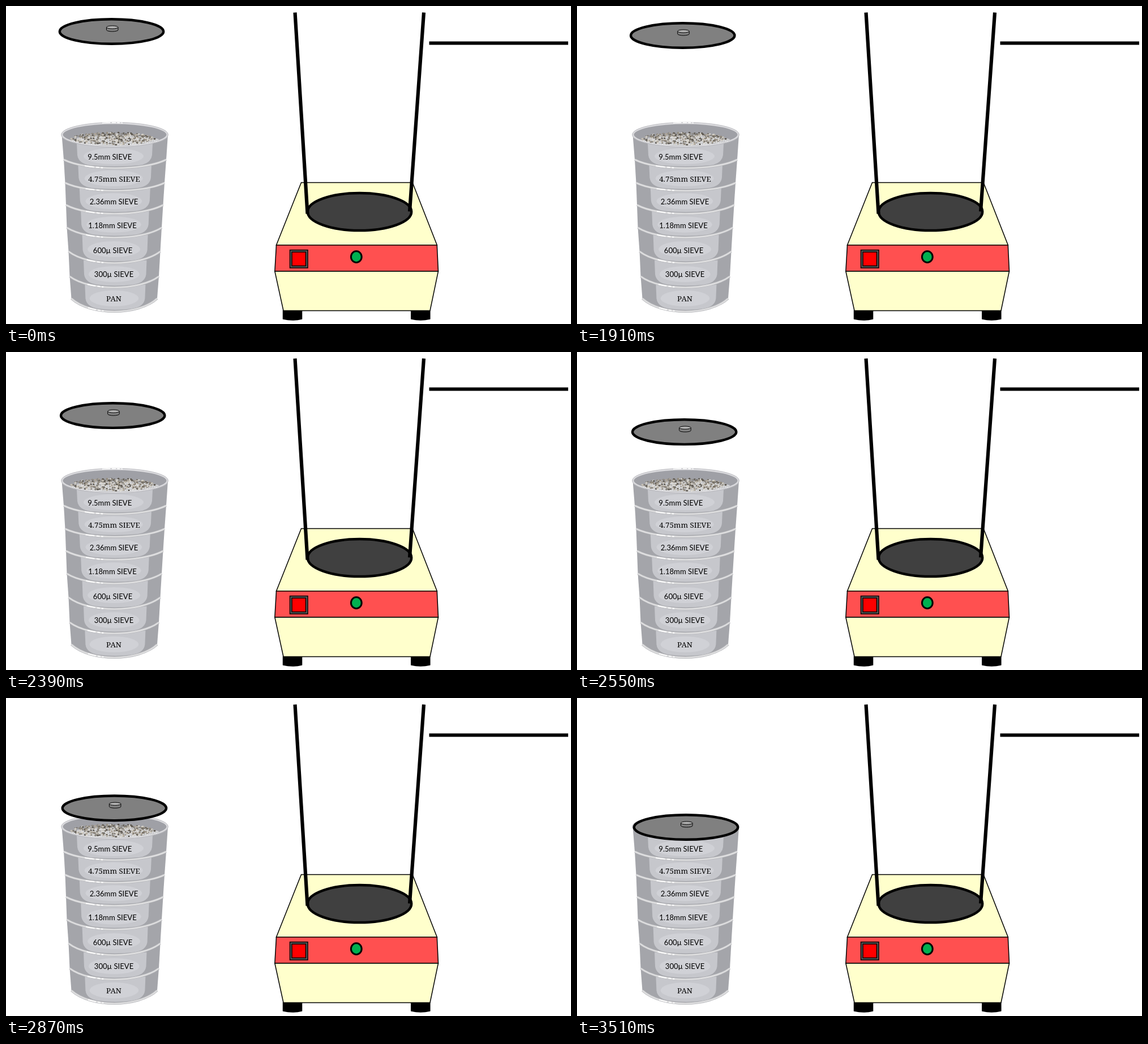
Animation, 998 px wide and 561 px high, one loop 5020 ms. Source, as an HTML page:

```html
<!DOCTYPE html>
<html lang="en">
<head>
<meta charset="utf-8">
<title>Sieve stack and shaker</title>
<style>
  html, body { margin: 0; width: 100%; height: 100%; overflow: hidden; background: #fff; }
  svg { display: block; width: 998px; height: 561px; }
  .sans { font: 13.1px Lato, sans-serif; }
  .serif { font: 13.3px "Noto Serif", serif; }
  text { text-anchor: middle; }
</style>
</head>
<body>
<svg viewBox="0 0 998 561">
  <defs>
    <pattern id="mesh" width="3" height="3" patternUnits="userSpaceOnUse">
      <rect width="3" height="3" fill="#b9babd"/>
      <rect width="2" height="2" fill="#ededee"/>
    </pattern>
    <clipPath id="opening"><ellipse cx="192" cy="227" rx="91" ry="19.5"/></clipPath>
  </defs>

  <g id="stack"></g>
  <g id="rim">
    <ellipse cx="192" cy="227" rx="93" ry="20.3" fill="#9fa0a6" stroke="#dcdcdf" stroke-width="3"/>
    <ellipse cx="192" cy="227" rx="94.3" ry="21.8" fill="none" stroke="#a9aaaf" stroke-width=".7"/>
    <path d="M170 206.5Q190 205 206 206.5" fill="none" stroke="#fff" stroke-width="1.6" stroke-dasharray="14 3 7 2 5 2"/>
    <g clip-path="url(#opening)">
      <ellipse cx="193" cy="238" rx="80" ry="10" fill="url(#mesh)"/>
      <g id="gravel"></g>
    </g>
  </g>
  <g id="labels"></g>

  <g id="lid" stroke="#000">
    <ellipse cx="186.5" cy="45" rx="91.7" ry="21.8" fill="#808080" stroke-width="4.4"/>
    <path d="M177.5 37.5V42.5A10.3 2.7 0 0 0 198 42.5V37.5" fill="#808080"/>
    <ellipse cx="187.75" cy="37.5" rx="10.25" ry="2.6" fill="#b3b3b3"/>
  </g>

  <g id="shaker" stroke="#000" stroke-width="1.5">
    <path id="foot" d="M489.5 537V552Q506 556 522.5 552V537Z"/>
    <use href="#foot" x="226.3"/>
    <path d="M521.5 311.5H718L761.3 421.8H477.5Z" fill="#ffc"/>
    <path d="M477.5 421.8H761.3L763.5 468H474.8Z" fill="#ff5050"/>
    <path d="M474.8 468H763.5L749 537.5H490Z" fill="#ffc"/>
    <ellipse cx="624.5" cy="363" rx="91.7" ry="33" fill="#404040" stroke-width="4.4"/>
    <path d="M510.5 11.5L532.5 366.5M738 11.5L713 362.5M747.5 65.5H993" stroke-width="6.2"/>
    <rect x="501.5" y="430.5" width="31.5" height="31.5" fill="#595959"/>
    <rect x="505" y="434" width="24.5" height="24.5" fill="#f00"/>
    <ellipse cx="618.8" cy="442.5" rx="9.4" ry="10" fill="#00b050" stroke-width="3"/>
  </g>
</svg>

<script>
const el = id => document.getElementById(id);

// Seams from the rim to the base: left x, right x, end height, middle height
const seams = [
  [98.5, 286, 227, 248], [102, 283, 271, 286], [104.5, 280, 312, 326],
  [106, 277.5, 351, 366.5], [107.5, 275, 391, 408.5], [110.5, 272.5, 433, 453.5],
  [112.5, 270, 477, 496.5], [115.5, 267, 516, 539]
];
const labels = [
  ["9.5mm SIEVE", 183.3, 271], ["4.75mm SIEVE", 191, 310, "serif"],
  ["2.36mm SIEVE", 190.5, 350], ["1.18mm SIEVE", 188, 391.5],
  ["600µ SIEVE", 188.5, 436], ["300µ SIEVE", 190.5, 477.5], ["PAN", 190.5, 520.5, "serif"]
];

function arc([left, right, end, middle]) {
  const inset = (right - left) * 0.22, low = end + (middle - end) * 4 / 3;
  return `C${left + inset} ${low} ${right - inset} ${low} ${right} ${end}`;
}
const stroke = (d, color, width, extra = "") =>
  `<path d="${d}" fill="none" stroke="${color}" stroke-width="${width}" ${extra}/>`;

function sieve(i) {
  const top = seams[i], base = seams[i + 1];
  const left = 125 + i * 2.4, right = 259 - i * 2.1, mid = (left + right) / 2;
  const y0 = top[3] - 3, y1 = base[3] - 3;
  return `
    <path d="M${top[0]} ${top[2]}L${base[0]} ${base[2]}${arc(base)}L${top[1]} ${top[2]}Z" fill="#a4a5aa"/>
    <path d="M${left} ${y0 - 2}Q${mid} ${y0 + 5} ${right} ${y0 - 2}L${right - 1} ${y1 - 20}Q${right - 3} ${y1 - 5} ${right - 24} ${y1 - 2}
      Q${mid} ${y1 + 2} ${left + 24} ${y1 - 2}Q${left + 3} ${y1 - 5} ${left + 1} ${y1 - 20}Z" fill="#c6c7cc"/>
    <ellipse cx="${mid - 2}" cy="${(y0 + y1) / 2 + 1}" rx="${53 - i * 1.6}" ry="14" fill="#d0d1d6"/>`;
}

function seamLine(seam) {
  const d = `M${seam[0]} ${seam[2]}${arc(seam)}`;
  return stroke(d, "#b4b5b9", 4) + stroke(d, "#dededf", 2.6) +
    stroke(d, "#fafafa", 2.2, 'pathLength="100" stroke-dasharray="0 21 9 2 3 1.5 2 100"');
}

el("stack").innerHTML = [6, 5, 4, 3, 2, 1, 0].map(sieve).join("") + seams.slice(1).map(seamLine).join("");
el("labels").innerHTML = labels.map(([text, x, y, font = "sans"]) =>
  `<text class="${font}" x="${x}" y="${y}">${text}</text>`).join("");

let seed = 7;
const random = () => (seed = seed * 16807 % 2147483647) / 2147483647;
const tones = ["#746d62", "#928a7d", "#b0a799", "#c6c0b5", "#57524b", "#8a867f", "#dcd8d0"];
el("gravel").innerHTML = Array.from({ length: 430 }, () => {
  const angle = random() * 2 * Math.PI, radius = Math.sqrt(random());
  const x = 189 + 75 * radius * Math.cos(angle), y = 234 + 11 * radius * Math.sin(angle);
  const size = 0.7 + random() * 0.9;
  return `<ellipse cx="${x.toFixed(1)}" cy="${y.toFixed(1)}" rx="${(size * 1.3).toFixed(1)}" ry="${size.toFixed(1)}" fill="${tones[Math.floor(random() * tones.length)]}"/>`;
}).join("");

const LOOP = 5020, START = 1590, TRAVEL = 1870, STEP = 40;
const ease = u => u ** 3 * (10 - 15 * u + 6 * u * u);

function draw(now) {
  // The small offset keeps rounding from delaying a step.
  const elapsed = Math.floor((now % LOOP - START + 0.5) / STEP) * STEP;
  const progress = ease(Math.min(1, Math.max(0, elapsed / TRAVEL)));
  el("lid").setAttribute("transform", `translate(${6 * progress} ${183 * progress})`);
  requestAnimationFrame(draw);
}
draw(performance.now());
</script>
</body>
</html>
```
